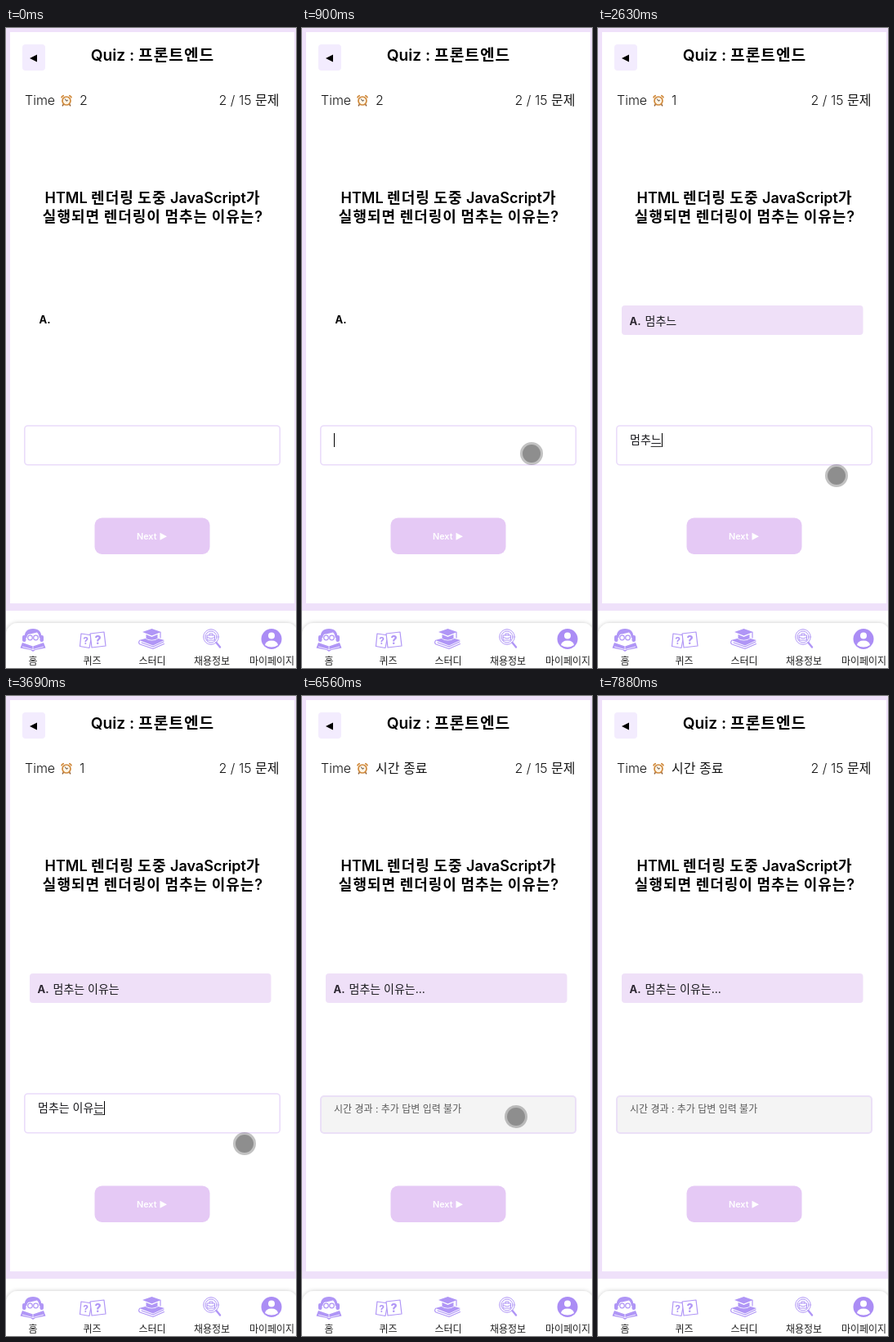
Write an HTML page that moves like this. It is 355 px wide and 782 px high and loops after 8220 ms.

```html
<!DOCTYPE html>
<html lang="ko">
<head>
<meta charset="utf-8">
<title>Quiz</title>
<style>
  html, body { margin: 0; width: 100%; height: 100%; overflow: hidden; background: #fff; }
  svg { display: block; }
  text { font-family: Inter, "Noto Sans CJK KR", "Noto Sans CJK", "Noto Sans CJK JP", sans-serif; white-space: pre; }
  .bold { font-weight: 600; text-anchor: middle; }
  .bold tspan { letter-spacing: 1px; }
  .info { font-size: 16px; font-weight: 300; fill: #161616; }
  .answer { font-size: 14px; fill: #1a1a1e; }
  .label { font-size: 13px; font-weight: 700; }
  .nav text { font-size: 12px; text-anchor: middle; fill: #222; }
  .line { fill: none; stroke: #b096f6; stroke-width: 1.2; stroke-linecap: round; stroke-linejoin: round; }
  .nav .solid { fill: #b096f6; }
</style>
</head>
<body>
<svg width="355" height="782" viewBox="0 0 355 782">
  <defs>
    <filter id="shadow" x="-10%" y="-30%" width="120%" height="160%">
      <feDropShadow dx="0" dy="0" stdDeviation="2.5" flood-color="#000" flood-opacity=".22"/>
    </filter>
  </defs>
  <rect width="358" height="712" fill="#efe1fa"/>
  <rect x="5" y="5" width="348" height="698" fill="#fff"/>

  <rect x="20" y="20" width="28" height="32" rx="4" fill="#f3ecfe"/>
  <path d="M29 37L38 32.500V41.500Z"/>
  <text class="bold" x="179.5" y="40" font-size="19.2">Quiz : <tspan>프론트엔드</tspan></text>

  <text class="info" x="23" y="94">Time</text>
  <g fill="none" stroke="#d08a3c">
    <path d="M70.5 93L69 95.300M77.500 93L79 95.300" stroke="#8a5a34" stroke-width="1.400"/>
    <path d="M68 85.500Q68 82.800 71 82.500M77 82.500Q80 82.800 80 85.500" stroke-width="1.600"/>
    <circle cx="74" cy="89" r="5" fill="#fff4e4" stroke-width="1.700"/>
    <path d="M72.300 86.500L74 89.300L76 88" stroke="#4b4038" stroke-width=".9"/>
  </g>
  <text class="info" id="time" x="90" y="94"></text>
  <text class="info" x="260.5" y="94">2 / 15 문제</text>

  <text class="bold" x="179.5" y="214" font-size="18">HTML <tspan>렌더링</tspan> <tspan>도중</tspan> JavaScript<tspan>가</tspan></text>
  <text class="bold" x="179.5" y="237" font-size="18"><tspan>실행되면</tspan> <tspan>렌더링이</tspan> <tspan>멈추는</tspan> <tspan>이유는</tspan>?</text>

  <text class="label" id="emptyLabel" x="40.5" y="361">A.</text>
  <g id="answerBox">
    <rect x="29" y="339" width="295.5" height="36" rx="4" fill="#efe0f8"/>
    <text class="label" x="38.5" y="363" fill="#2c2631">A.</text>
    <text class="answer" id="answer" x="57.5" y="363"></text>
  </g>

  <g id="openInput">
    <rect x="22.8" y="486" width="312.5" height="47.8" rx="4" fill="#fff" stroke="#eadcfa" stroke-width="1.6"/>
    <text class="answer" id="typed" x="39" y="508"></text>
    <rect id="underline" y="511" width="13" height="1" fill="#333"/>
    <rect id="caret" y="495" width="1" height="17"/>
  </g>
  <g id="closedInput">
    <rect x="23" y="489" width="312" height="45" rx="4" fill="#f4f4f4" stroke="#ebe0f7" stroke-width="2"/>
    <text x="39" y="509" font-size="12" fill="#5a5a5a">시간 경과 : 추가 답변 입력 불가</text>
  </g>

  <rect x="108.5" y="598.500" width="141" height="44.500" rx="9" fill="#e5c9f5"/>
  <text x="160" y="625" font-size="10.8" font-weight="600" fill="#fff">Next</text>
  <path d="M188.5 616.8L197 621.3L188.5 625.8Z" fill="#fff"/>

  <g class="nav">
    <rect y="727" width="358" height="70" rx="15" fill="#fff" filter="url(#shadow)"/>
    <g>
      <path class="solid" d="M22.500 745Q22.500 734 33 734T43.500 745Z"/>
      <path d="M25.500 746Q25 740 30 740.500Q36 739 38 738.500Q41 741 40.500 746Q40 753 33 753T25.500 746Z" fill="#fff"/>
      <rect class="solid" x="20" y="742" width="4.500" height="8" rx="2"/>
      <rect class="solid" x="41.500" y="742" width="4.500" height="8" rx="2"/>
      <g class="line"><circle cx="29.500" cy="745" r="2.800"/><circle cx="36.500" cy="745" r="2.800"/></g>
      <path class="solid" d="M20 751L33 755.500L46 751L48.500 757.500L36 760L33 762L30 760L17.500 757.500Z"/>
      <path d="M20 756L33 759.500L46 756M33 755.500V760" fill="none" stroke="#fff" stroke-width=".8"/>
    </g>
    <g>
      <path class="line" d="M92 740L105 742L102 757.5L90.5 755.5Z"/>
      <path class="line" d="M103 740L120 738L122 755L105 757Z" style="fill:#fff"/>
      <text class="solid" x="97.5" y="753" style="font-weight:700">?</text>
      <text class="solid" x="112.5" y="752.5" style="font-weight:800;font-size:14px">?</text>
    </g>
    <g>
      <path class="solid" d="M167 738L178.500 734L190 738L178.500 742.500Z"/>
      <path class="solid" d="M171.500 741L178.500 744L185.500 741V746Q178.500 749.500 171.500 746Z"/>
      <path class="line" d="M189 738.500V745"/>
      <path class="solid" d="M163 748L170.500 746Q178.500 751 186.500 746L194 748L180 754.500Z"/>
      <path class="line" d="M163.500 748.500Q161.500 751.500 164 753L180 758.500L193.500 752.500M166 751L180 756L193 750"/>
    </g>
    <g>
      <g class="line" style="stroke-width:1"><circle cx="251" cy="744" r="9.300"/><circle cx="251" cy="744" r="7"/></g>
      <path class="line" d="M246.500 742H255.500V748H246.500ZM249 742V740H253V742M246.500 744.500L251 746L255.500 744.500" style="stroke-width:1"/>
      <path class="line" d="M257.500 751L262 756.500" style="stroke-width:2.400"/>
    </g>
    <g>
      <circle cx="325" cy="746.5" r="12.5" fill="#ab8df5"/>
      <circle cx="325" cy="742.5" r="4" fill="#fff"/>
      <path d="M317 754Q318 748.500 325 748.500T333 754Q325 759 317 754Z" fill="#fff"/>
    </g>
    <text x="33" y="778">홈</text>
    <text x="105.500" y="778">퀴즈</text>
    <text x="179" y="778">스터디</text>
    <text x="252" y="778">채용정보</text>
    <text x="325.500" y="778">마이페이지</text>
  </g>

  <g id="pointer">
    <circle r="14" fill-opacity=".24"/>
    <circle r="11" fill="#8e8e8e"/>
  </g>
</svg>
<script>
const LOOP = 8220, TYPING_START = 1290, TIME_UP = 5490;

// [start ms, text] as the syllables are composed
const typing = [
  [0, ''], [1290, 'ㅁ'], [1550, '머'], [1950, '멈'], [2170, '멈ㅊ'], [2240, '멈추'],
  [2440, '멈춘'], [2510, '멈추느'], [2640, '멈추는'], [2770, '멈추는 '], [2840, '멈추는 ㅇ'],
  [2940, '멈추는 이'], [3020, '멈추는 잉'], [3160, '멈추는 이유'], [3490, '멈추는 이윤'],
  [3560, '멈추는 이유느'], [3690, '멈추는 이유는'], [4020, '멈추는 이유는.'],
  [4220, '멈추는 이유는..'], [4480, '멈추는 이유는...']
];

// [start ms, x, y]; no position means the pointer is off the page
const path = [
  [0], [140, 324, 760], [210, 299, 712], [280, 272, 655], [350, 261, 599], [420, 264, 550],
  [490, 270, 516], [560, 274, 502], [900, 281, 520], [970, 292, 547],
  [5560, 284, 541], [5630, 276, 535], [5820, 276, 530], [5890, 275, 524], [6000, 275, 520],
  [6090, 275, 528], [6160, 275, 535], [6490, 268, 522], [6560, 262, 514], [6630, 257, 507],
  [6760, 257, 509], [7160, 248, 530], [7230, 241, 558], [7290, 250, 592], [7360, 263, 630],
  [7420, 272, 668], [7490, 294, 708], [7550, 322, 738], [7620, 343, 752], [7810, 350, 766], [7880]
];

const $ = id => document.getElementById(id);
const at = (steps, t) => steps.findLast(step => step[0] <= t);
const show = (id, visible) => $(id).style.display = visible ? '' : 'none';

function draw() {
  const t = performance.now() % LOOP;
  const text = at(typing, t)[1];
  const [, x, y] = at(path, t);

  $('time').textContent = t < 970 ? '2' : t < TIME_UP ? '1' : '시간 종료';
  $('answer').textContent = $('typed').textContent = text;
  show('emptyLabel', t < TYPING_START);
  show('answerBox', t >= TYPING_START);
  show('openInput', t < TIME_UP);
  show('closedInput', t >= TIME_UP);

  if (t < TIME_UP) {
    const end = 39 + (text ? $('typed').getComputedTextLength() : 0);
    $('caret').setAttribute('x', Math.round(end));
    $('underline').setAttribute('x', end - 13);
  }
  show('caret', t >= 840 && t < 5010);
  show('underline', /[ㄱ-ㅎ가-힣]$/.test(text));

  show('pointer', x !== undefined);
  if (x !== undefined) $('pointer').setAttribute('transform', `translate(${x} ${y})`);
  requestAnimationFrame(draw);
}
draw();
</script>
</body>
</html>
```
